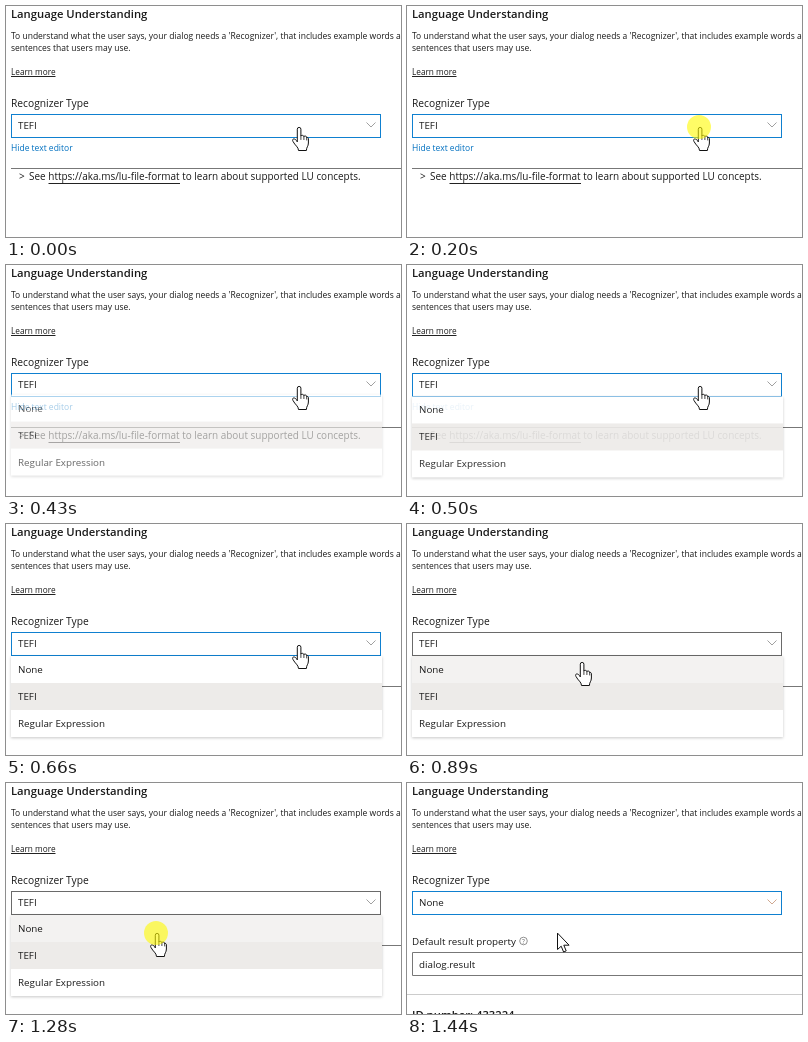
Recreate the animation shown at these times as an HTML page. Size 395x231 px, loop 2.3 s.

```html
<!DOCTYPE html>
<html lang="en">
<head>
<meta charset="utf-8">
<title>Recognizer type</title>
<style>
html, body { margin: 0; width: 100%; height: 100%; overflow: hidden; background: #fff; }
svg { display: block; font: 9.8px "Open Sans", "Noto Sans", sans-serif; fill: #1a1a1a; }
.title { font-size: 11.25px; font-weight: 600; }
.small { font-size: 8.5px; }
.label { font-size: 10.25px; }
.note { font-size: 9.96px; }
.line { fill: none; stroke: #777; }
.cursor { fill: #fff; stroke: #111; stroke-linejoin: round; stroke-linecap: round; }
#menu { filter: drop-shadow(0 1px 1.5px rgba(0, 0, 0, .22)); }
</style>
</head>
<body>
<svg width="395" height="231">
  <text class="title" x="5" y="12">Language Understanding</text>
  <g class="small">
    <text x="5" y="33">To understand what the user says, your dialog needs a 'Recognizer', that includes example words and</text>
    <text x="5" y="45">sentences that users may use.</text>
    <text x="5" y="69" font-size="8.25">Learn more</text>
  </g>
  <path class="line" style="stroke:#222" d="M5 70.5h44.5"/>
  <text class="label" x="5" y="101">Recognizer Type</text>

  <g id="before">
    <text class="small" x="5" y="145" fill="#0070c0">Hide text editor</text>
    <path class="line" d="M5 162.5h390"/>
    <g class="note">
      <text x="13" y="174">&gt;</text>
      <text x="23" y="174">See</text>
      <text x="42.3" y="174">https://aka.ms/lu-file-format to learn about supported LU concepts.</text>
    </g>
    <path class="line" style="stroke:#222" d="M42.5 177.5h131.5"/>
  </g>

  <g id="after">
    <text x="5" y="162">Default result property</text>
    <circle class="line" cx="116.5" cy="158" r="3.8" stroke-width=".8"/>
    <text x="116.5" y="160.5" font-size="6.5" text-anchor="middle" fill="#666">?</text>
    <path class="line" d="M400 169.5H5.5v23H400"/>
    <text x="12" y="185">dialog.result</text>
    <path class="line" style="stroke:#ccc" d="M0 211.5h395"/>
    <text class="title" x="5" y="236">ID number: 433224</text>
  </g>

  <rect id="box" x="5.5" y="108.5" width="369" height="23" fill="#fff"/>
  <text id="value" x="12" y="123"></text>
  <path id="chevron" fill="none" d="M360.5 116.5l4.5 4.5 4.5-4.5"/>

  <g id="menu">
    <rect x="5" y="132" width="371" height="81" fill="#fff"/>
    <rect id="hover" x="5" y="132" width="371" height="27" fill="#f3f2f1"/>
    <rect x="5" y="159" width="371" height="27" fill="#edebe9"/>
    <text x="12" y="149">None</text>
    <text x="12" y="176">TEFI</text>
    <text x="12" y="203">Regular Expression</text>
  </g>

  <g id="pointer">
    <g id="hand" class="cursor" transform="translate(-1 0)">
      <path d="M.3 14.5V2.2a1.8 1.8 0 0 1 3.6 0V9a1.7 1.7 0 0 1 3 .6a1.6 1.6 0 0 1 2.8.8a1.4 1.4 0 0 1 1.7 1.6V16c0 3.5-2 4-2 7.5H1.5C1.5 20-2 18.5-4 14.5C-5.5 11.8-2.5 11-1 13z"/>
      <path d="M3.9 9v3.5M6.9 9.6v3M9.7 10.4v2.6" fill="none" stroke-width=".8"/>
    </g>
    <path id="arrow" class="cursor" d="M.5.5V16.5L4.2 13.2L6.6 19L9.2 17.9L6.8 12.2H11.7z"/>
    <circle id="click" r="12" fill="#fffa00" opacity=".6"/>
  </g>
</svg>
<script>
const LOOP = 2300, OPEN = 360, DONE = 1440;
const START = { x: 292, y: 121 }, END = { x: 150, y: 150 };
const FADE_STEPS = [360, 430, 500, 580, 660];
const MOVE_STEPS = [740, 810, 890, 960, 1050, 1130];

const $ = id => document.getElementById(id);
const show = (id, on) => $(id).style.display = on ? "" : "none";
const easeOut = (a, power) => 1 - (1 - a) ** power;
const mix = (a, b, p) => a + (b - a) * p;

// Progress from 0 to 1 that only advances at the given times
function stepped(t, steps) {
  const first = steps[0], last = steps[steps.length - 1];
  const now = steps.filter(s => s <= t).pop() ?? first;
  return (now - first) / (last - first);
}

function draw(t) {
  const done = t >= DONE;
  const fade = easeOut(stepped(t, FADE_STEPS), 4);
  const move = stepped(t, MOVE_STEPS);
  const x = mix(START.x, END.x, easeOut(move, 3.7));
  const y = mix(START.y, END.y, easeOut(move, 1.85));
  const onItem = y > 132;

  show("before", !done);
  show("after", done);
  show("menu", t >= OPEN && !done);
  show("hover", onItem);
  show("hand", !done);
  show("arrow", done);
  show("click", (t >= 200 && t < OPEN) || (t >= 1280 && !done));

  $("value").textContent = done ? "None" : "TEFI";
  $("box").setAttribute("stroke", onItem && !done ? "#6a6a6a" : "#0f80d0");
  $("chevron").setAttribute("stroke", done ? "#d0a890" : "#a0a0a0");
  $("menu").setAttribute("opacity", fade);
  $("menu").setAttribute("transform", `translate(0 ${-7 * (1 - fade)})`);
  $("pointer").setAttribute("transform", `translate(${Math.round(x)} ${Math.round(y)})`);
}

const begin = performance.now();
function tick() {
  draw((performance.now() - begin) % LOOP);
  requestAnimationFrame(tick);
}
tick();
</script>
</body>
</html>
```
